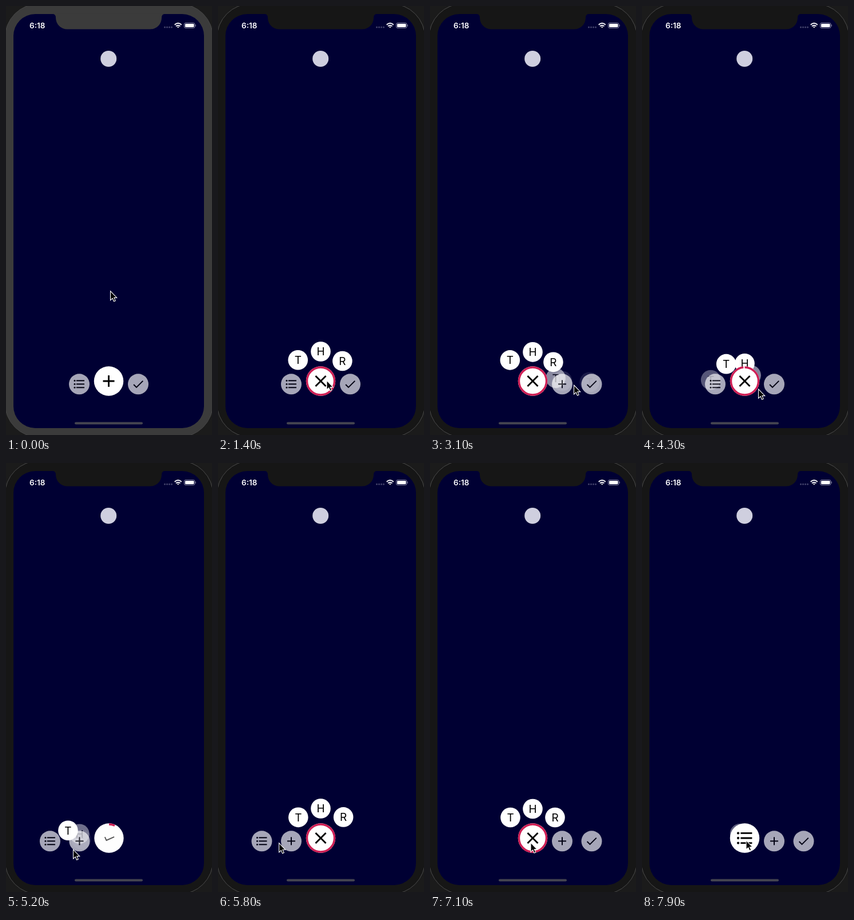
Write an HTML page that moves like this. It is 360 px wide and 748 px high and loops after 8 s.

```html
<!DOCTYPE html>
<html lang="en">
<head>
<meta charset="utf-8">
<title>Radial menu carousel</title>
<style>
  html, body { margin: 0; width: 100%; height: 100%; overflow: hidden; background: #1b1b1b; }
  svg { display: block; width: 360px; height: 748px; }
  text { font-family: Inter, "Liberation Sans", sans-serif; }
  .child text { font-size: 19px; text-anchor: middle; fill: #000; }
  .icon { fill: none; stroke: #000; stroke-width: 2; }
  .icon circle { fill: #000; stroke: none; }
  #body { fill: #3b3b3b; stroke: #454545; }
  #notch { fill: #3b3b3b; }
  .focused #body { fill: #161616; stroke: #4a4a4a; }
  .focused #notch { fill: #161616; }
</style>
</head>
<body>
<svg id="stage" viewBox="0 0 360 748">
  <rect width="360" height="748" fill="#1b1b1b"/>
  <rect id="body" x="-2" y="-4" width="364" height="756" rx="60"/>
  <rect x="13" y="14" width="333" height="722" rx="38" fill="#003"/>
  <path id="notch" d="M81 13.5Q87 14 87 20.5A20 20 0 0 0 107 40.5H252A20 20 0 0 0 272 20.5Q272 14 278 13.5Z"/>

  <text x="41" y="38.5" font-size="13.5" font-weight="600" fill="#fff">6:18</text>
  <path d="M277.5 37H290" stroke="#43436b" stroke-width="3" stroke-linecap="round" stroke-dasharray="0 4"/>
  <g fill="none" stroke="#fff" stroke-width="1.9">
    <path d="M294.7 32.8Q300.7 27.4 306.7 32.8M297 35.3Q300.7 32 304.4 35.3"/>
    <path d="M299 36.4L300.7 38.3L302.4 36.4Q300.7 35 299 36.4Z" fill="#fff" stroke="none"/>
  </g>
  <rect x="311.5" y="29.5" width="18.5" height="9" rx="2.5" fill="none" stroke="#8585a0"/>
  <rect x="313" y="31" width="15.5" height="6" rx="1.3" fill="#fff"/>
  <path d="M331.3 32.5V35.5" stroke="#8585a0"/>

  <circle cx="179.2" cy="92" r="14" fill="#cfcfdf"/>
  <g id="menu"></g>
  <rect x="120" y="725.5" width="119" height="4" rx="2" fill="#454550"/>
  <path id="cursor" d="M0 0V16L3.7 12.7L6 18L8.7 16.9L6.4 11.6H11.2Z" fill="#000" stroke="#fff" stroke-width="1.1"/>
</svg>
<script>
(() => {
  const LOOP = 8000, FOCUS = 800, GAP = 51.5, CENTER = 179.5;
  const STAGGER = 60, MOVE_LEAD = 300, MOVE_TIME = 400, DRAG = 70;
  const $ = id => document.getElementById(id);
  const clamp = v => Math.max(0, Math.min(1, v));
  const mix = (a, b, k) => a + (b - a) * k;
  const smooth = v => { const k = clamp(v); return k * k * (3 - 2 * k); };
  const easeOut = v => 1 - (1 - clamp(v)) ** 3;

  const icons = [
    '<circle cx="-8" cy="-6" r="1.5"/><circle cx="-8" r="1.5"/><circle cx="-8" cy="6" r="1.5"/><path d="M-5-6H9M-5 0H9M-5 6H9"/>',
    '<path d="M-7 0H7M0-7V7"/>',
    '<path d="M-7.9 .7L-3 5.6L8.3-5.7"/>'
  ];
  const cross = '<path d="M-6.3-6.3L6.3 6.3M-6.3 6.3L6.3-6.3"/>';
  const children = [['T', -39, -36], ['H', 0, -51], ['R', 39, -36]];

  // page, menu opens, menu closes, where the cursor rests
  const visits = [
    [1, 950, 1650, 190, 653],
    [2, 1850, 2755, 150, 666],
    [1, 2430, 2820, 210, 664],
    [0, 2685, 3995, 251.5, 661],
    [1, 4045, 4968, 203.5, 668],
    [2, 5182, 6035, 117.5, 674],
    [0, 6120, 7600, 176, 662]
  ];
  const togglesOf = page => visits.filter(v => v[0] === page).flatMap(v => [v[1], v[2]]);

  const childMarkup = ([label]) =>
    `<g class="child"><circle r="17.3" fill="#fff"/><text y="6.9">${label}</text></g>`;

  const items = icons.map((icon, page) => {
    const root = document.createElementNS('http://www.w3.org/2000/svg', 'g');
    root.innerHTML = [...children].reverse().map(childMarkup).join('') +
      `<g class="host"><circle r="18" fill="#fff"/>
       <circle class="ring" r="16.8" fill="none" stroke="#cf1f55" stroke-width="2.4" pathLength="360" transform="rotate(-90)"/>
       <g class="icon">${icon}</g><g class="icon">${cross}</g></g>`;
    $('menu').append(root);
    return {
      root, page,
      toggles: togglesOf(page),
      kids: [...root.querySelectorAll('.child')].reverse(),
      host: root.querySelector('.host'),
      ring: root.querySelector('.ring'),
      glyphs: root.querySelectorAll('.icon')
    };
  });

  function spring(s) {
    if (s <= 0) return 0;
    const w = .0081, a = .0102;
    return 1 - Math.exp(-a * s) * (Math.cos(w * s) + a / w * Math.sin(w * s));
  }

  function lastToggle(times, t) {
    const n = times.filter(at => at <= t).length;
    return { open: n % 2 === 1, since: n ? t - times[n - 1] : Infinity };
  }

  // opening runs T, H, R; closing runs the other way round
  function reach(times, k, t) {
    return times.reduce((value, at, n) => {
      const closing = n % 2;
      const delay = STAGGER * (closing ? 2 - k : k + 1);
      return mix(value, 1 - closing, spring(t - at - delay));
    }, 0);
  }

  const pageAt = t => visits.reduce((page, [to, open]) =>
    mix(page, to, easeOut((t - open + MOVE_LEAD) / MOVE_TIME)), 1);

  function pose(glyph, size, turn) {
    glyph.setAttribute('transform', `rotate(${turn}) scale(${size})`);
    glyph.setAttribute('opacity', size);
  }

  function drawIcon({ glyphs: [own, close], toggles }, t) {
    const { open, since } = lastToggle(toggles, t + 30);
    const leave = clamp(since / (open ? 140 : 80));
    const enter = open ? clamp((since - 200) / 80) : clamp((since - 80) / 110);
    pose(open ? own : close, 1 - leave, 60 * leave);
    pose(open ? close : own, enter, 60 * (enter - 1));
  }

  function drawItem(item, current, t) {
    const offset = item.page - current, near = clamp(1 - Math.abs(offset));
    item.root.setAttribute('transform', `translate(${CENTER + GAP * offset} ${mix(659.3, 654, near)})`);
    item.host.setAttribute('transform', `scale(${mix(1, 1.43, near)})`);
    item.host.setAttribute('opacity', mix(.65, 1, near));

    item.kids.forEach((kid, k) => {
      const c = reach(item.toggles, k, t), [, dx, dy] = children[k];
      kid.setAttribute('transform', `translate(${dx * c} ${dy * c})`);
      kid.setAttribute('opacity', clamp((c - .05) / .45));
    });

    const { open, since } = lastToggle(item.toggles, t);
    const sweep = 360 * (open ? clamp(since / 259) : 1 - clamp(since / 200));
    item.ring.setAttribute('stroke-dasharray', `${sweep} 720`);
    item.ring.setAttribute('opacity', sweep ? near : 0);
    drawIcon(item, t);
  }

  // before each page move the cursor backs off, then drags to its resting place
  function drawCursor(t) {
    let x = 182.5, y = 497, last = 1;
    for (const [page, open, , restX, restY] of visits) {
      const start = open - MOVE_LEAD;
      const back = smooth((t - start + 140) / 140), drag = smooth((t - start) / 250);
      const grabX = restX + DRAG * Math.sign(page - last);
      x = mix(mix(x, grabX, back), restX, drag);
      y = mix(y, restY, back);
      last = page;
    }
    const settle = smooth((t - 7300) / 250);
    $('cursor').setAttribute('transform', `translate(${mix(x, 182, settle)} ${mix(y, 658, settle)})`);
  }

  let front;
  function raise(item) {
    if (item === front) return;
    front = item;
    $('menu').append(item.root);
  }

  function draw(elapsed) {
    const t = elapsed % LOOP, current = pageAt(t);
    $('stage').classList.toggle('focused', t >= FOCUS);
    raise(items[Math.round(current)]);
    items.forEach(item => drawItem(item, current, t));
    drawCursor(t);
  }

  let start;
  function tick(now) {
    start ??= now;
    draw(now - start);
    requestAnimationFrame(tick);
  }
  draw(0);
  requestAnimationFrame(tick);
})();
</script>
</body>
</html>
```
